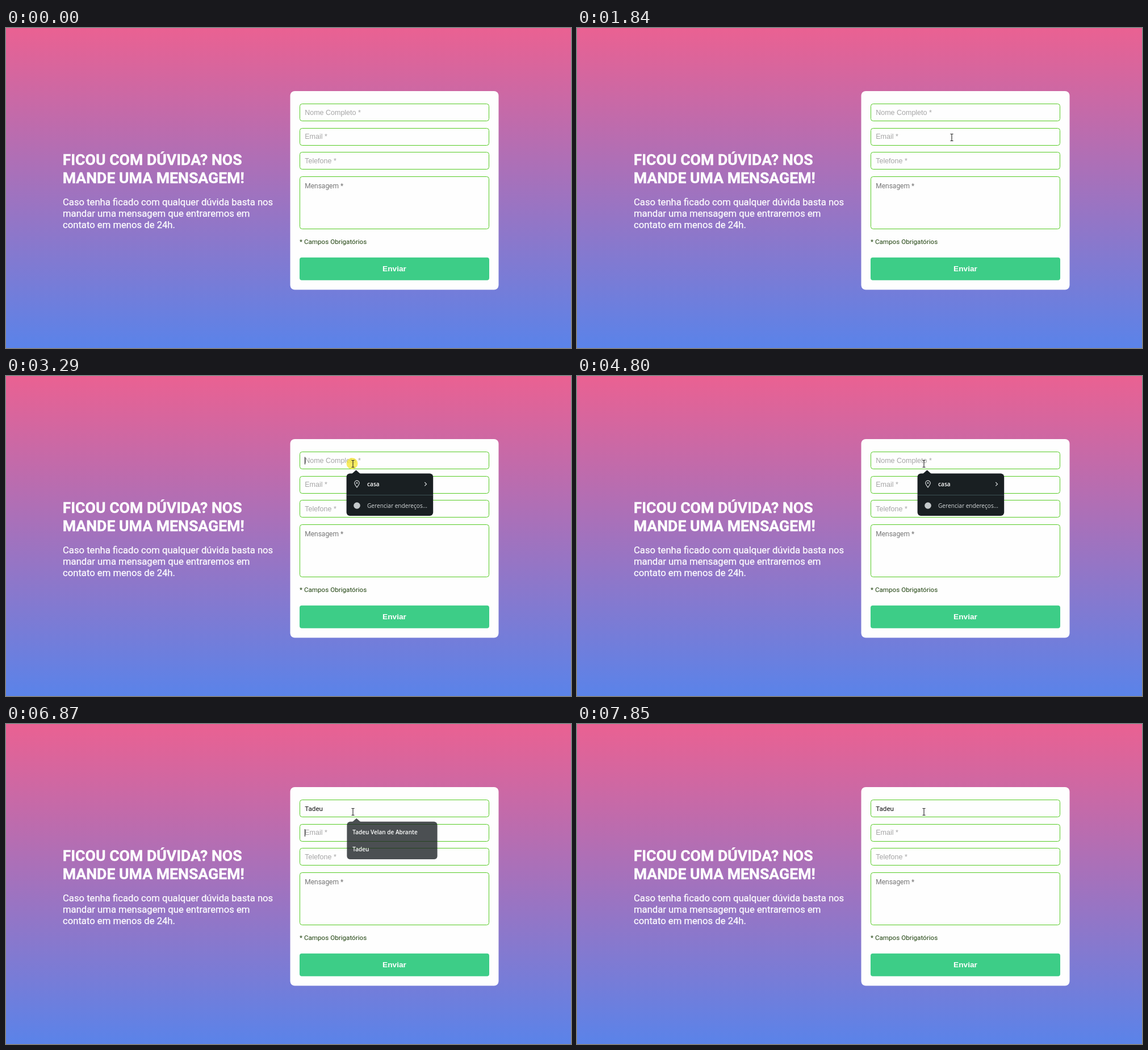
An HTML page for the animation above (8 s loop, 995 px wide and 563 px high).

```html
<!DOCTYPE html>
<html lang="pt-BR">
<head>
<meta charset="utf-8">
<title>Formulário de contato</title>
<style>
  html, body { margin: 0; width: 100%; height: 100%; overflow: hidden; }
  svg { display: block; width: 995px; height: 563px; font-family: Roboto, sans-serif; }
  .title { font-size: 26.67px; font-weight: 700; fill: #fff; stroke: #fff; stroke-width: .4; }
  .lead { font-size: 16.67px; fill: #fff; stroke: #fff; stroke-width: .25; }
  .field { fill: #fefefe; stroke: #56cb24; }
  .hint { font: 12.5px "Liberation Sans", Arial, sans-serif; fill: #a5a5a5; }
  .small { font-size: 11.67px; }
  .send { font: bold 13.7px "Liberation Sans", Arial, sans-serif; fill: #fff; text-anchor: middle; }
  .menu { font: 10.15px "Open Sans", sans-serif; fill: #d5d9db; }
  .menu .strong { font-weight: 600; fill: #fff; }
  .box { fill: #191f22; }
  .line { fill: none; stroke: #d5d9db; stroke-width: 1.2; }
</style>
</head>
<body>
<svg viewBox="0 0 995 563">
  <defs>
    <linearGradient id="sky" x2="0" y2="1">
      <stop stop-color="#ea6192"/>
      <stop offset="1" stop-color="#5a83e9"/>
    </linearGradient>
  </defs>
  <rect width="995" height="563" fill="url(#sky)"/>

  <g class="title">
    <text x="99.7" y="241.3">FICOU COM DÚVIDA? NOS</text>
    <text x="99.7" y="273">MANDE UMA MENSAGEM!</text>
  </g>
  <g class="lead">
    <text x="100" y="312">Caso tenha ficado com qualquer dúvida basta nos</text>
    <text x="100" y="332">mandar uma mensagem que entraremos em</text>
    <text x="100" y="352">contato em menos de 24h.</text>
  </g>

  <rect x="500.5" y="111" width="367" height="349.5" rx="8" fill="#fefefe"/>
  <g class="field">
    <rect x="517.5" y="133.5" width="333" height="30" rx="4"/>
    <rect x="517.5" y="176.5" width="333" height="30" rx="4"/>
    <rect x="517.5" y="218.5" width="333" height="30" rx="4"/>
    <rect x="517.5" y="261.5" width="333" height="92" rx="4"/>
  </g>
  <g class="hint">
    <text id="nameHint" x="526.2" y="152.7">Nome Completo *</text>
    <text x="526.2" y="195">Email *</text>
    <text x="526.2" y="237.7">Telefone *</text>
  </g>
  <text x="526.2" y="282" font-size="12" fill="#757575">Mensagem *</text>
  <text id="name" class="small" x="526.2" y="153" fill="#111"></text>
  <text class="small" x="517" y="379.5" fill="#1d400c">* Campos Obrigatórios</text>
  <rect x="517" y="403.7" width="334" height="40" rx="4" fill="#3dcd87"/>
  <text class="send" x="684" y="428">Enviar</text>
  <rect id="caret" width="1" height="13" fill="#111"/>

  <g id="addressMenu" class="menu">
    <path class="box" d="M608 173L616.5 165.5L625 173z"/>
    <rect class="box" x="599.6" y="171.6" width="152.6" height="74.4" rx="6"/>
    <path d="M600 209.5H752" stroke="#3d5053"/>
    <path class="line" d="M618 196C615.5 192.5 613.8 190.5 613.8 188.3A4.2 4.2 0 0 1 622.2 188.3C622.2 190.5 620.5 192.5 618 196z"/>
    <circle cx="618" cy="188.3" r="1.3"/>
    <path class="line" d="M737.3 187L740.5 190.2L737.3 193.4"/>
    <text class="strong" x="636" y="194">casa</text>
    <circle cx="618" cy="228" r="5.8" fill="#c5cacc"/>
    <text x="636" y="232">Gerenciar endereços...</text>
  </g>
  <g id="nameMenu" class="menu">
    <path class="box" d="M608 173L616.5 165.5L625 173z"/>
    <rect class="box" x="599.5" y="171.5" width="161" height="67" rx="6"/>
    <text class="strong" x="609.5" y="194">Tadeu Velan de Abrante</text>
    <text class="strong" x="609.5" y="224">Tadeu</text>
  </g>

  <circle id="press" cx="609.5" cy="154" r="10" fill="#f6e52c" opacity=".75"/>
  <path id="arrow" d="M.5 .5V13L3.5 10.3L5.6 15.2L7.6 14.3L5.6 9.6H9.6z" fill="#fff" stroke="#000" stroke-width=".9"/>
  <path id="beam" d="M-2.5 -6H-.8L0 -5.4L.8 -6H2.5M0 -5.4V5.4M-2.5 6H-.8L0 5.4L.8 6H2.5" fill="none" stroke="#222" stroke-width="1.1"/>
</svg>
<script>
  const LOOP = 8000, NAME = "Tadeu";
  const el = id => document.getElementById(id);
  const show = (id, on) => el(id).style.display = on ? "" : "none";
  const progress = (t, from, to) => Math.min(1, Math.max(0, (t - from) / (to - from)));
  const within = (t, from, to) => t >= from && t < to;

  // time, x, y of the pointer
  const path = [
    [140, 976, 559], [400, 968, 443], [680, 907, 327], [940, 850, 267],
    [1040, 850, 267], [1300, 808, 247], [1560, 727, 214], [1840, 660, 192.5],
    [1940, 660, 192.5], [2500, 610, 167], [2600, 610, 167], [2740, 611, 154.5]
  ];
  const fieldRows = [[133, 164], [176, 207], [218, 249], [261, 354]];
  const keyTimes = [5610, 5820, 5890, 5950, 6020];

  function pointerAt(t) {
    const next = path.findIndex(p => p[0] > t);
    if (next < 0) return path[path.length - 1].slice(1);
    const [t0, x0, y0] = path[next - 1], [t1, x1, y1] = path[next];
    const k = (t - t0) / (t1 - t0);
    return [x0 + (x1 - x0) * k, y0 + (y1 - y0) * k];
  }

  function drawPointer(t) {
    const visible = t >= path[0][0];
    const [x, y] = visible ? pointerAt(t) : [0, 0];
    const overField = x > 517 && x < 850 && fieldRows.some(([a, b]) => y > a && y < b);
    show("arrow", visible && !overField);
    show("beam", visible && overField);
    el(overField ? "beam" : "arrow").setAttribute("transform", `translate(${x} ${y})`);
    show("press", within(t, 2800, 3340));
  }

  function drawMenu(id, alpha, cx, cy) {
    const scale = 1 - .05 * (1 - alpha);
    show(id, alpha > 0);
    el(id).setAttribute("opacity", alpha);
    el(id).setAttribute("transform",
      `translate(${cx} ${cy}) scale(${scale}) translate(${-cx} ${-cy})`);
  }

  function drawCaret(t, typedWidth) {
    const inEmail = t >= 6540;
    const on = within(t, 2800, 3780) || within(t, 4280, 4800) || within(t, 5320, 6520)
      || within(t, 6540, 7850);
    show("caret", on);
    el("caret").setAttribute("x", inEmail ? 526 : 526 + Math.round(typedWidth));
    el("caret").setAttribute("y", inEmail ? 185 : 142.5);
  }

  function draw(t) {
    const typed = NAME.slice(0, keyTimes.filter(k => t >= k).length);
    el("name").textContent = typed;
    show("nameHint", !typed);
    drawCaret(t, typed ? el("name").getComputedTextLength() : 0);

    const fadeIn = 1 - (1 - progress(t, 2840, 3240)) ** 1.6;
    const fadeOut = 1 - progress(t, 6520, 7430) ** 1.6;
    drawMenu("addressMenu", t < keyTimes[0] ? fadeIn : 0, 676, 206);
    drawMenu("nameMenu", t >= keyTimes[0] ? fadeOut : 0, 680, 203);
    drawPointer(t);
  }

  const start = performance.now();
  function tick() {
    draw((performance.now() - start) % LOOP);
    requestAnimationFrame(tick);
  }
  tick();
</script>
</body>
</html>
```
